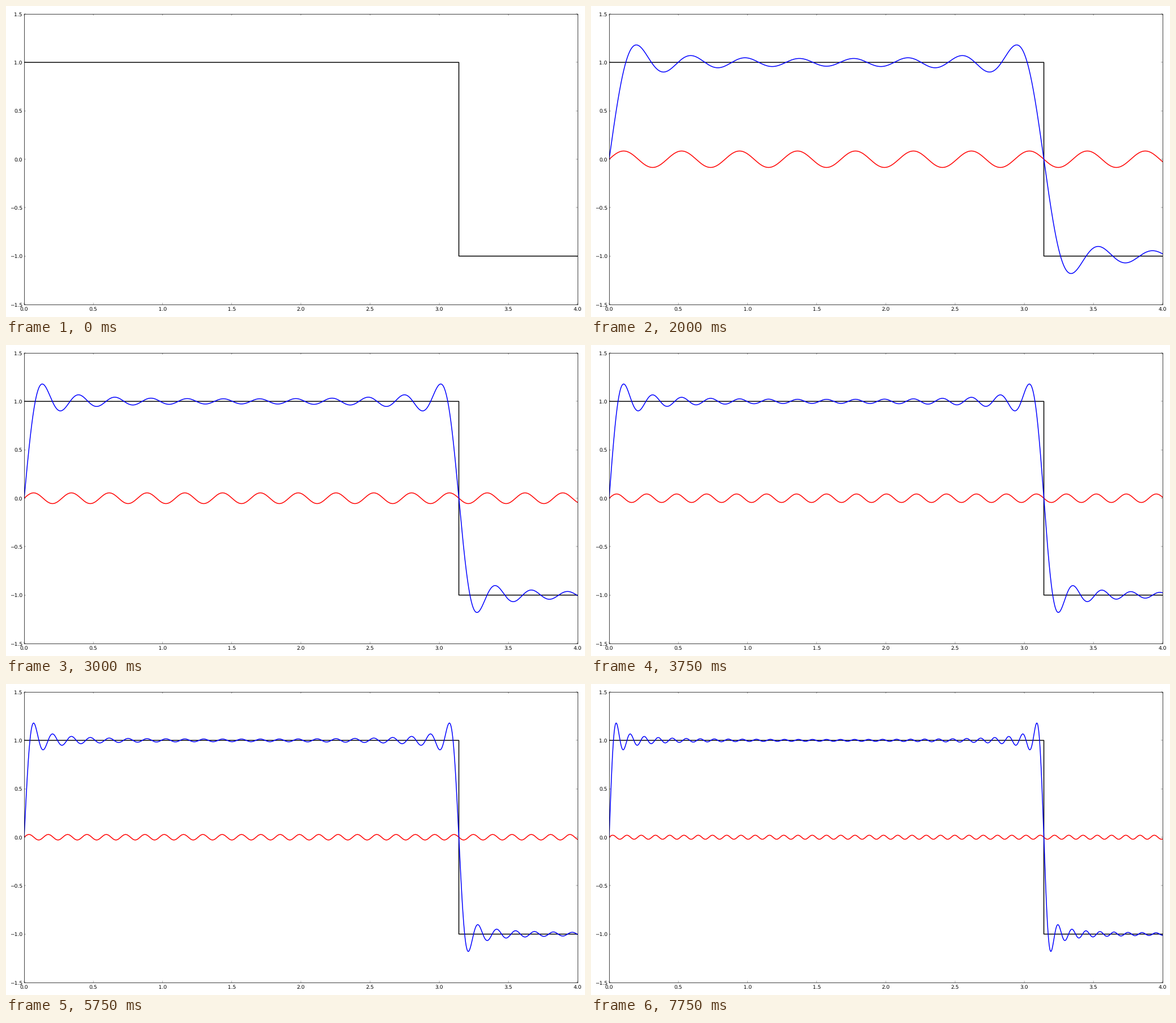
Recreate the animation shown at these times as a matplotlib script. Size 1021 by 548 pixels, loop 8 s.

```python
import numpy as np
import matplotlib.pyplot as plt
from matplotlib.animation import FuncAnimation

W, H, DPI = 1021, 548, 100
FRAMES, INTERVAL = 32, 250
LEFT, RIGHT, TOP, BOTTOM = 32, 1008, 14, 526  # plot box in pixels


def px(n):
    """Pixels to points."""
    return n * 72 / DPI


plt.rcParams.update({
    "font.family": "DejaVu Sans",
    "text.hinting": "none",
    "axes.unicode_minus": True,
})

fig = plt.figure(figsize=(W / DPI, H / DPI), dpi=DPI, facecolor="white")
ax = fig.add_axes([LEFT / W, 1 - BOTTOM / H, (RIGHT - LEFT) / W, (BOTTOM - TOP) / H])
ax.set_xlim(0, 4)
ax.set_ylim(-1.5, 1.5)
ax.set_xticks(np.arange(0, 4.1, 0.5))
ax.set_yticks(np.arange(-1.5, 1.6, 0.5))
ax.set_axisbelow(False)
ax.tick_params(direction="in", top=True, right=True, length=px(3),
               width=px(0.4), labelsize=px(9.2))
ax.tick_params(axis="x", pad=px(4))
ax.tick_params(axis="y", pad=px(3))
for spine in ax.spines.values():
    spine.set_linewidth(px(0.75))


def curve(color):
    line, = ax.plot([], [], color=color, lw=px(1.5), snap=False)
    return line


square, harmonic, partial_sum = (curve(c) for c in ("#000000", "#ff0000", "#0000ff"))
square.set_data([0, np.pi, np.pi, 4], [1, 1, -1, -1])

x = np.linspace(0, 4, 2001)


def term(k):
    """k-th odd harmonic of the square wave."""
    n = 2 * k - 1
    return 4 / (np.pi * n) * np.sin(n * x)


def update(count):
    if count == 0:
        harmonic.set_data([], [])
        partial_sum.set_data([], [])
    else:
        harmonic.set_data(x, term(count))
        partial_sum.set_data(x, sum(term(k) for k in range(1, count + 1)))
    return harmonic, partial_sum


anim = FuncAnimation(fig, update, frames=FRAMES, init_func=lambda: update(0),
                     interval=INTERVAL, repeat=True, repeat_delay=0, blit=False)
plt.show()
```
